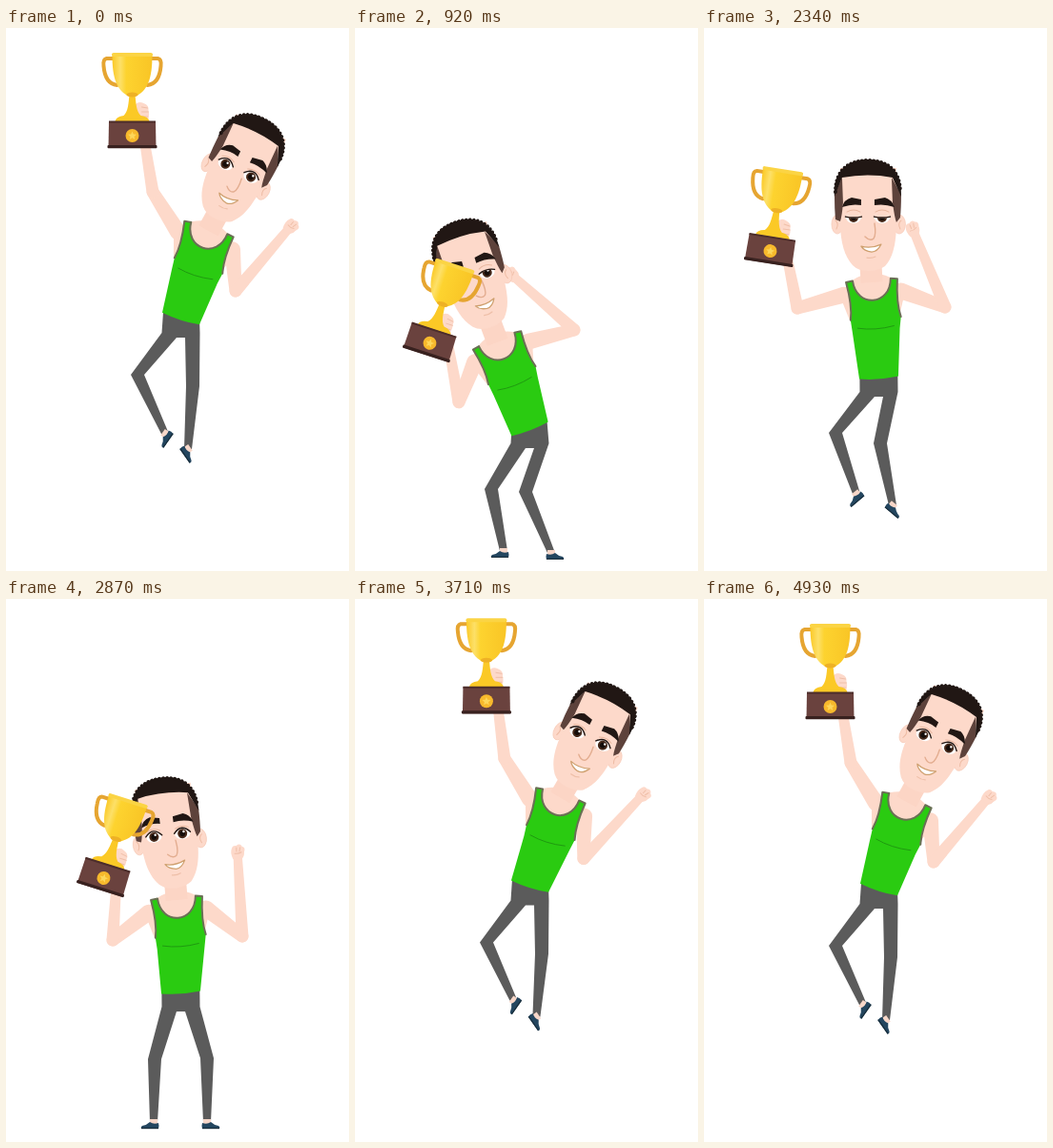
An HTML page that plays this animation: 360x570 px, repeating every 5 s.

```html
<!DOCTYPE html>
<html lang="en">
<head>
<meta charset="utf-8">
<title>Champion jump</title>
<style>
html, body { margin: 0; width: 100%; height: 100%; overflow: hidden; background: #fff; }
svg { display: block; width: 100%; height: 100%; }
.skin { fill: #fdd9ca; }
.line { fill: none; stroke-linecap: round; stroke-linejoin: round; }
</style>
</head>
<body>
<svg viewBox="0 0 360 570" xmlns="http://www.w3.org/2000/svg">
  <defs>
    <linearGradient id="gold">
      <stop offset="0" stop-color="#fbc926"/><stop offset=".2" stop-color="#fde068"/>
      <stop offset=".35" stop-color="#fdd32f"/><stop offset="1" stop-color="#f9c526"/>
    </linearGradient>
    <g id="shoe">
      <path d="M-4-3H4V2H-4Z" fill="#f6d6c8"/>
      <path d="M-5 1Q0 3 4 0Q7 3 12 4Q14 5 13 7H-5Q-6 4-5 1Z" fill="#24465f"/>
      <path d="M-5 6.600H13" stroke="#172c3a" stroke-width="1.200"/>
    </g>
    <g id="eye">
      <ellipse rx="8" ry="5.800" fill="#fff"/>
      <circle r="5" fill="#46291a"/>
      <circle r="3" fill="#150d0a"/>
      <circle r="1.200" cx="1.500" cy="-2" fill="#fff"/>
    </g>
  </defs>

  <path id="pants" fill="#5b5b5b"/>
  <use id="footL" href="#shoe"/><use id="footR" href="#shoe"/>
  <path id="upperL" class="skin"/><path id="foreL" class="skin"/>
  <path id="upperR" class="skin"/><path id="foreR" class="skin"/>
  <g id="fist">
    <path class="skin" d="M-5 7Q-8 0-6-4Q-5-8-1-7Q3-10 5-6Q9-5 7 0Q7 5 4 7Z"/>
    <path class="line" d="M-1-5L-1-1M3-5L2-1M-3 1Q1 2 4 0" stroke="#efbfa9"/>
  </g>
  <path id="bust" class="skin"/>
  <path id="neck" class="line" stroke="#fcd5c5" stroke-width="23" style="stroke-linecap:butt"/>
  <path id="shirt" fill="#2acb11"/>
  <path id="trim" class="line" stroke="#6a6f55" stroke-width="2"/>
  <path id="crease" class="line" stroke="#1f9a10"/>

  <g id="head">
    <g class="skin" stroke="#f6c9b6" stroke-width=".7">
      <ellipse cx="-32" cy="1" rx="6" ry="10"/><ellipse cx="33" cy="1" rx="6.500" ry="10"/>
    </g>
    <path class="line" d="M-34-3Q-30 0-33 6M35-3Q31 0 34 6" stroke="#eebca5"/>
    <path class="skin" d="M-29-58H30L30 5C29 24 26 36 18 45Q11 50 0 50Q-10 50-16 44C-25 34-28 20-29 4Z"/>
    <path d="M-35-30L-27-48L-26-22Q-27-8-29-2L-34-4Q-35-16-35-30ZM35-30L25-48L26-22Q28-6 30-1L34-6Q35-16 35-30Z" fill="#5d423b"/>
    <path d="M-35-28C-36-47-28-67 0-67C28-67 36-47 35-28L26-48Q0-53-27-48Z" fill="#211714"/>
    <path class="line" d="M-34-33C-34-50-26-66 0-66C26-66 34-50 34-33" stroke="#211714" stroke-width="4" stroke-dasharray="0 4"/>
    <path d="M-27-17Q-25-25-17-27L-7-25V-19Q-16-21-27-17ZM28-17Q25-25 18-27L7-25V-19Q17-21 28-17Z" fill="#211714"/>
    <use href="#eye" x="-15" y="-6"/><use href="#eye" x="15" y="-6"/>
    <g id="lids"></g>
    <path class="line" d="M7 0Q9 12 6 16Q2 19-3 14" stroke="#e3ad90" stroke-width="1.400"/>
    <path class="line" d="M-7 24Q3 27 14 22Q10 30 4 30Q-4 29-7 24Z" style="fill:#fff" stroke="#cfa06f" stroke-width="1.300"/>
    <path class="line" d="M-1 36Q4 37 8 35" stroke="#eebfa8" stroke-width="1.200"/>
  </g>

  <g id="hand">
    <path class="skin" d="M-6 12V-6Q-2-12 4-9Q10-7 9-1Q11 5 7 11Z"/>
    <path class="line" d="M2-5L8-4M2 0L9 0M2 5L8 5" stroke="#efbfa9"/>
  </g>
  <g id="trophy">
    <path class="line" d="M-20-81H-27Q-31-80-30-73C-29-61-24-54-16-53M20-81H27Q31-80 30-73C29-61 24-54 16-53" stroke="#e6a531" stroke-width="4"/>
    <path d="M-18-15Q-17-20-9-21C-4-26-4-34-3-43H3C4-34 4-26 9-21Q17-20 18-15Z" fill="#fbc926"/>
    <path d="M-21-86H21C21-64 18-49 5-42H-5C-18-49-21-64-21-86Z" fill="url(#gold)"/>
    <ellipse cy="-43" rx="6" ry="2.500" fill="#eeb125"/>
    <rect x="-21.500" y="-87" width="43" height="4" rx="2" fill="#fbd444"/>
    <path d="M-24.500-15H24.500L25 13H-25Z" fill="#6a423e"/>
    <path d="M-24.500-14.500H24.500" stroke="#4c2d2a" stroke-width="2"/>
    <rect x="-26" y="10" width="52" height="3.200" rx="1" fill="#38211f"/>
    <circle r="7" fill="#f7b92c"/>
    <path d="M0-4.500L1.300-1.500L4.500-1.200L2 .9L2.800 4L0 2.300L-2.800 4L-2 .9L-4.500-1.200L-1.300-1.500Z" fill="#fdd75a"/>
  </g>
</svg>
<script>
const LOOP = 5000;
const $ = id => document.getElementById(id);

// chest, head and trophy: x, y, angle
const rise = {
  hip: 305, chest: [213, 211, 18], head: [241, 155, 27], lid: 0, trophy: [132.5, 113, 0],
  elbowL: [154, 172], elbowR: [241, 276], fist: [299, 208],
  kneeL: [138, 364], kneeR: [196, 376], ankleL: [167, 426], ankleR: [191, 442], foot: 55
};
const apex = {
  hip: 299, chest: [218, 203, 17], head: [246, 150, 27], lid: 0, trophy: [142, 103, 0],
  elbowL: [159, 164], elbowR: [239, 270], fist: [305, 203],
  kneeL: [138, 358], kneeR: [196, 370], ankleL: [166, 418], ankleR: [190, 436], foot: 55
};
const stand = {
  hip: 410, chest: [194.5, 312, 7], head: [209, 252, 13], lid: 0, trophy: [136.5, 242, 11],
  elbowL: [119, 300], elbowR: [272, 332], fist: [271, 243],
  kneeL: [168, 480], kneeR: [201, 480], ankleL: [162, 548], ankleR: [205, 548], foot: 0
};
const settle = {
  hip: 413, chest: [179, 314, -4], head: [171, 254, -7], lid: 0, trophy: [102.5, 293, 17.5],
  elbowL: [112, 358], elbowR: [248, 354], fist: [243, 266],
  kneeL: [156, 483], kneeR: [211, 482], ankleL: [155, 549], ankleR: [211, 549], foot: 0
};
const crouch = {
  hip: 421, chest: [149, 328, -21], head: [126, 267, -17], lid: .4, trophy: [78.5, 331, 18],
  elbowL: [109, 393], elbowR: [230, 317], fist: [164, 259],
  kneeL: [143, 484], kneeR: [179, 487], ankleL: [156, 549], ankleR: [206, 551], foot: 0
};
const push = {
  hip: 367, chest: [176, 265, -4], head: [172, 205, 0], lid: .8, trophy: [69.5, 234, 9],
  elbowL: [98, 294], elbowR: [253, 293], fist: [219, 211],
  kneeL: [138, 425], kneeR: [185, 436], ankleL: [160, 489], ankleR: [198, 501], foot: 40
};

const lerp = (a, b, u) => a + (b - a) * u;
const out = p => u => 1 - (1 - u) ** p;
const into = p => u => u ** p;
const smooth = u => u * u * (3 - 2 * u);

const mix = (a, b, u) => Object.fromEntries(Object.keys(a).map(k => [k,
  Array.isArray(a[k]) ? a[k].map((v, i) => lerp(v, b[k][i], u)) : lerp(a[k], b[k], u)]));

// Each jump passes the rise pose at these times
const jumps = [0, 1157, 2412, 3689, 4930];

function poseAt(t) {
  const n = jumps.findLastIndex(j => j <= t);
  if (n === jumps.length - 1) return rise;
  const s = t - jumps[n], d = jumps[n + 1] - jumps[n];
  const keys = [
    [0, rise], [55, apex, out(2.6)], [235, apex, smooth], [350, stand, into(1.6)],
    [376, stand, smooth], [458, settle, out(1.6)], [d - 360, settle, smooth],
    [d - 235, crouch, smooth], [d - 79, push, into(1.2)], [d, rise, out(1.4)]
  ];
  const i = keys.findIndex(k => k[0] > s);
  const [t0, a] = keys[i - 1], [t1, b, ease] = keys[i];
  return mix(a, b, ease((s - t0) / (t1 - t0)));
}

// Exposures: first time, last time, count
const ticks = [
  [0, 0, 1], [70, 590, 9], [660, 1120, 8], [1200, 1200, 1], [1400, 1860, 8], [1930, 2400, 8],
  [2470, 2940, 8], [3010, 3510, 8], [3570, 4040, 8], [4100, 4570, 8], [4640, 4930, 5]
].flatMap(([a, b, n]) => Array.from({ length: n }, (_, i) => n > 1 ? lerp(a, b, i / (n - 1)) : a));

const rad = a => a * Math.PI / 180;
const P = p => p[0].toFixed(2) + ' ' + p[1].toFixed(2);
const poly = (...pts) => 'M' + pts.map(P).join('L') + 'Z';
const draw = (id, d) => $(id).setAttribute('d', d);
const place = (id, x, y, a = 0, extra = '') =>
  $(id).setAttribute('transform', `translate(${x} ${y}) ${extra} rotate(${a})`);

// Local frame: maps (u, v) around x, y turned by a
const frame = (x, y, a) => {
  const c = Math.cos(rad(a)), s = Math.sin(rad(a));
  return (u, v) => [x + u * c - v * s, y + u * s + v * c];
};

// Tapered limb with round ends
function limb(id, a, b, ra, rb) {
  const q = Math.atan2(b[1] - a[1], b[0] - a[0]);
  const side = (p, r) => P([p[0] - Math.sin(q) * r, p[1] + Math.cos(q) * r]);
  draw(id, `M${side(a, ra)}L${side(b, rb)}A${rb} ${rb} 0 0 0 ${side(b, -rb)}` +
    `L${side(a, -ra)}A${ra} ${ra} 0 0 0 ${side(a, ra)}Z`);
}

function render(p) {
  const chest = frame(...p.chest), hem = frame(183.5, p.hip, p.chest[2]);
  const head = frame(...p.head), cup = frame(...p.trophy);
  const grip = cup(8, -25), armR = Math.atan2(p.fist[1] - p.elbowR[1], p.fist[0] - p.elbowR[0]);

  const crotch = p.hip + 20, beside = ([x, y], w) => [x + w, y];
  draw('pants', poly(hem(-20, -2), hem(20, -2), [203.5, crotch - 5],
    beside(p.kneeR, 7), beside(p.ankleR, 4), beside(p.ankleR, -4), beside(p.kneeR, -7), [188, crotch],
    [179, crotch], beside(p.kneeL, 7), beside(p.ankleL, 4), beside(p.ankleL, -4), beside(p.kneeL, -7),
    [163.5, crotch - 5]));
  place('footL', ...p.ankleL, p.foot, 'scale(-1 1)');
  place('footR', ...p.ankleR, p.foot);

  limb('upperL', chest(-30, 13), p.elbowL, 8.5, 6.5);
  limb('foreL', p.elbowL, grip, 6.5, 4.5);
  limb('upperR', chest(30, 13), p.elbowR, 8.5, 6.5);
  limb('foreR', p.elbowR, p.fist, 6.5, 4.5);
  place('fist', ...p.fist, armR * 180 / Math.PI + 90);

  draw('bust', `M${P(chest(-33, 18))}Q${P(chest(-30, 0))} ${P(chest(-10, -6))}` +
    `L${P(chest(10, -6))}Q${P(chest(30, 0))} ${P(chest(33, 18))}L${P(chest(26, 40))}L${P(chest(-26, 40))}Z`);
  draw('neck', `M${P(head(2, 28))}L${P(chest(0, 2))}`);

  const neckline = `M${P(chest(-20, -1))}C${P(chest(-18, 28))} ${P(chest(18, 28))} ${P(chest(20, -1))}`;
  const sideR = `Q${P(chest(24, 25))} ${P(chest(28, 40))}`;
  const sideL = `Q${P(chest(-22, 25))} ${P(chest(-27, 0))}`;
  draw('shirt', neckline + `L${P(chest(27, 0))}${sideR}L${P(chest(26, 52))}L${P(hem(20.5, 0))}` +
    `Q${P(hem(0, 3))} ${P(hem(-20.5, 0))}L${P(chest(-24, 52))}L${P(chest(-25, 40))}${sideL}Z`);
  draw('trim', `${neckline}M${P(chest(27, 0))}${sideR}M${P(chest(-25, 40))}${sideL}` +
    `L${P(chest(-20, -1))}M${P(chest(27, 0))}L${P(chest(20, -1))}`);
  draw('crease', `M${P(chest(-18, 49))}Q${P(chest(0, 53))} ${P(chest(20, 49))}`);

  place('head', ...p.head);
  const edge = -11 + p.lid * 15;
  $('lids').innerHTML = [-15, 15].map(x => `<g transform="translate(${x} -6)">` +
    `<path class="skin" d="M-8.500 0Q0-14 8.500 0Q0 ${edge}-8.500 0Z"/>` +
    `<path class="line" d="M-8.500-1Q0 ${edge} 8.500-1" stroke="#211714" stroke-width="1.400"/>` +
    `<path class="line" d="M-7-6Q0-10 7-6" stroke="#e8b79f"/></g>`).join('');

  place('hand', ...grip, p.trophy[2]);
  place('trophy', ...p.trophy);
}

const start = performance.now();
let shown;
function tick() {
  const t = (performance.now() - start) % LOOP;
  const at = ticks.findLast(k => k <= t + 8);
  if (at !== shown) render(poseAt(shown = at));
  requestAnimationFrame(tick);
}
tick();
</script>
</body>
</html>
```
